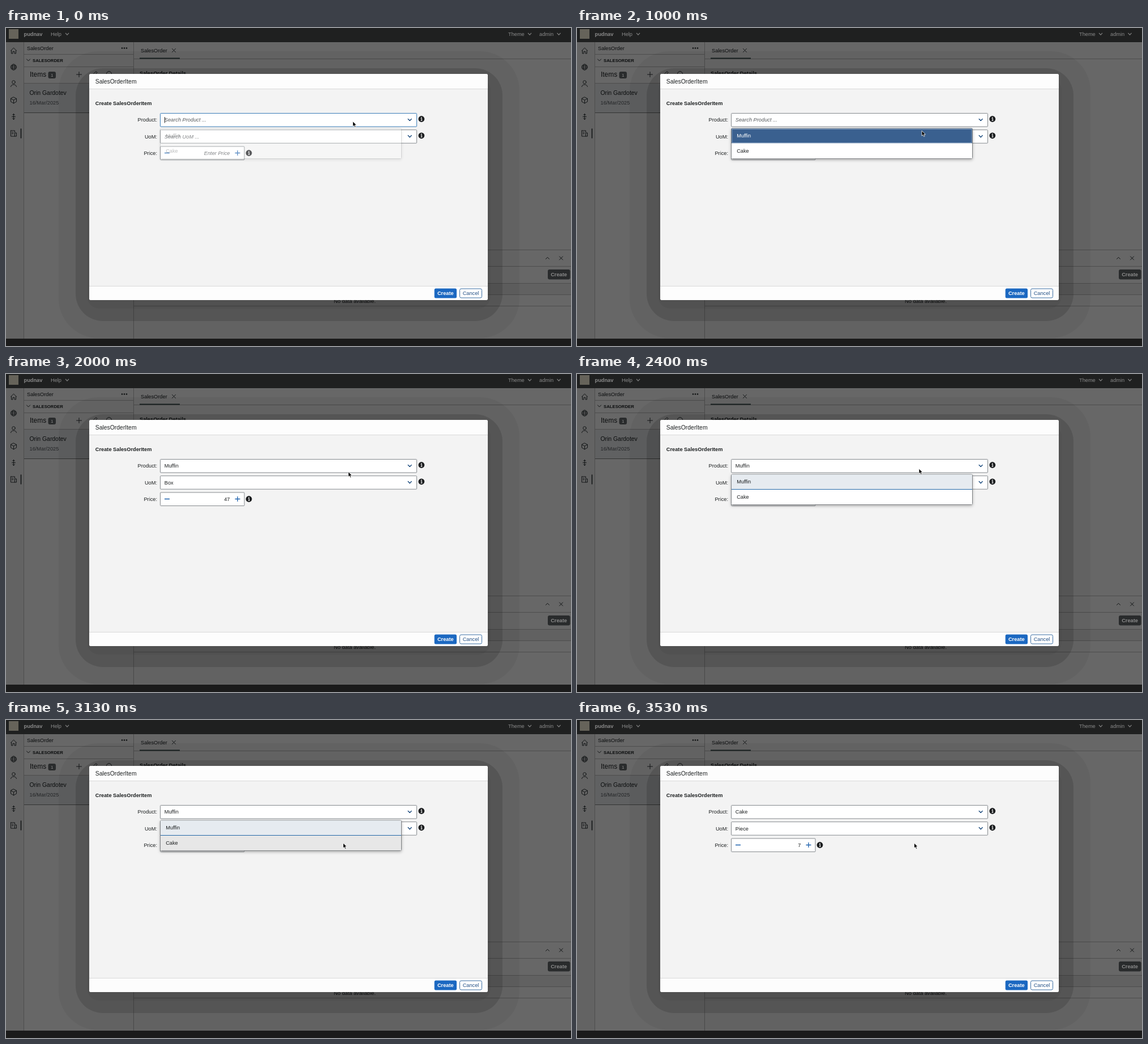
An HTML page that plays this animation: 998 by 561 pixels, repeating every 3670 ms.

```html
<!DOCTYPE html>
<html lang="en">
<head>
<meta charset="utf-8">
<title>Sales order dialog</title>
<style>
html, body { margin: 0; width: 100%; height: 100%; overflow: hidden; background: #666; }
svg { display: block; width: 998px; height: 561px; }
text { font: 9.24px "Liberation Sans", Arial, sans-serif; fill: #1d2021; white-space: pre; }
.b { font-weight: 700; }
.i { font-style: italic; fill: #55595c; }
.e { text-anchor: end; }
.m { text-anchor: middle; }
.big { font-size: 10.4px; }
.dim text { fill: #0b0d0e; }
.dim .bar { fill: #8a8a8a; }
.ico { fill: none; stroke: #121516; stroke-width: 1; stroke-linecap: round; stroke-linejoin: round; }
.rule { fill: none; stroke: #4d4d4d; stroke-width: 1; }
.box { fill: #fff; stroke: #858a8e; stroke-width: 1; }
.chev { fill: none; stroke: #1f4e80; stroke-width: 1.4; stroke-linecap: round; stroke-linejoin: round; }
.step { fill: none; stroke: #1b5fad; stroke-width: 1.3; }
</style>
</head>
<body>
<svg viewBox="0 0 998 561" xmlns="http://www.w3.org/2000/svg">
  <defs>
    <g id="info">
      <circle r="5.4" fill="#1b1d1f"/>
      <path d="M-1.2-.8H.4V2.6M-1.3 2.7H1.5" fill="none" stroke="#fff" stroke-width="1.1"/>
      <circle cy="-2.7" r=".85" fill="#fff"/>
    </g>
    <path id="down" d="M-3-1.6L0 1.6L3-1.6"/>
    <path id="cross" d="M-3-3L3 3M3-3L-3 3"/>
    <filter id="soft" x="-5%" y="-30%" width="110%" height="170%">
      <feDropShadow dx="0" dy="2" stdDeviation="2.4" flood-color="#000" flood-opacity=".28"/>
    </filter>
  </defs>

  <!-- dimmed page -->
  <g class="dim">
    <rect width="998" height="561" fill="#676767"/>
    <rect y="25" width="31" height="523" fill="#636363"/>
    <rect x="32" y="97" width="193" height="52" fill="#606162"/>
    <rect x="226" y="450" width="772" height="20" fill="#616161"/>
    <path class="rule" d="M31.500 25V548M225.500 25V548M32 46.500H225M32 68.500H225M32 97.500H225M226 54.500H998M226 391.500H998M226 420.500H998M226 450.500H998M226 470.500H998M226 490.500H998"/>
    <path d="M32 149.500H225" stroke="#333" />
    <rect x="236" y="52.500" width="71" height="2" fill="#1a2222"/>

    <text x="37" y="38.500">SalesOrder</text>
    <g fill="#0d1011"><circle cx="205" cy="35.500" r="1.3"/><circle cx="209" cy="35.500" r="1.3"/><circle cx="213" cy="35.500" r="1.3"/></g>
    <use href="#down" class="ico" x="39.500" y="56.500"/>
    <text class="b" x="47" y="59.500" style="font-size:7.75px">SALESORDER</text>
    <text x="42" y="86" style="font-size:11.9px">Items</text>
    <rect x="74.500" y="77" width="13.500" height="12" rx="3" fill="#292b2c"/>
    <text class="m bar" x="81.200" y="86" style="font-size:8px">1</text>
    <path class="ico" d="M124.500 82H133.500M129 77.500V86.500M154 84L154.500 81L159 76.500L161 78.500L157 83" stroke-width="1.2"/>
    <circle class="ico" cx="182" cy="81" r="4.500"/>
    <text class="big" x="41.500" y="118">Orin Gardotev</text>
    <text x="41.500" y="135" style="fill:#232527">16/Mar/2025</text>

    <text x="238" y="43">SalesOrder</text>
    <use href="#cross" class="ico" x="296.500" y="39.500"/>
    <text class="b" x="236" y="82.500">SalesOrder Details</text>
    <path class="ico" d="M953.500 407.500L956.500 404.500L959.500 407.500"/>
    <use href="#cross" class="ico" x="980.500" y="406"/>
    <text class="m" x="616" y="484.500">No data available.</text>

    <g class="ico">
      <path d="M8.500 40L13.500 35L18.500 40M9.500 39.500V45H12V41.500H15V45H17.500V39.500"/>
      <circle cx="13.500" cy="69" r="5"/>
      <ellipse cx="13.500" cy="69" rx="2.300" ry="5"/>
      <path d="M8.500 69H18.500M9.200 66.500H17.800M9.200 71.500H17.800"/>
      <circle cx="13.500" cy="95.500" r="2.800"/>
      <path d="M8.500 103.500C9 98.500 18 98.500 18.500 103.500"/>
      <path d="M13.500 122L18.500 124.500V130L13.500 132.800L8.500 130V124.500ZM8.500 124.500L13.500 127.200L18.500 124.500M13.500 127.200V132.800"/>
      <path d="M13.500 151.500V161.500M11.500 153.500L13.500 151.500L15.500 153.500M11.500 159.500L13.500 161.500L15.500 159.500M10.500 156.500H16.500"/>
      <path d="M8.500 181H15.500V184M8.500 181V191H18.500V185H15.500V191M10.500 184H13M10.500 186.500H13"/>
      <path d="M26.500 178V194" stroke-width="1.600"/>
    </g>

    <!-- stepped shade around the dialog -->
    <rect x="93" y="41" width="814" height="506" rx="70" opacity=".05"/>
    <rect x="123" y="71" width="754" height="446" rx="48" opacity=".13"/>
    <rect x="143" y="88" width="713" height="407" rx="22" opacity=".05"/>

    <rect x="957" y="426" width="39.500" height="17.500" rx="3" fill="#292b2c"/>
    <text class="b m bar" x="976.500" y="438">Create</text>

    <rect width="998" height="25" fill="#1f2020"/>
    <rect y="548" width="998" height="13" fill="#1b1b1b"/>
    <rect x="5" y="2" width="17" height="17" fill="#66635a"/>
    <text class="b bar" x="31.500" y="13.500">pudnav</text>
    <text class="bar" x="79" y="13.500">Help</text>
    <text class="bar" x="887" y="13.500">Theme</text>
    <text class="bar" x="942" y="13.500">admin</text>
    <g fill="none" stroke="#858585" stroke-width="1.200">
      <use href="#down" x="108" y="10.500"/><use href="#down" x="925" y="10.500"/><use href="#down" x="976.500" y="10.500"/>
    </g>
  </g>

  <!-- dialog -->
  <rect x="147" y="81" width="704" height="399" rx="3" fill="#f3f3f3"/>
  <path d="M147 107V84Q147 81 150 81H848Q851 81 851 84V107ZM147 456V477Q147 480 150 480H848Q851 480 851 477V456Z" fill="#fdfdfd"/>
  <path d="M147 107.500H851M147 455.500H851" stroke="#d9d9d9"/>
  <text class="big" x="157.800" y="98">SalesOrderItem</text>
  <text class="b" x="157.800" y="136">Create SalesOrderItem</text>
  <text class="e" x="267" y="165.200">Product:</text>
  <text class="e" x="267" y="194.500">UoM:</text>
  <text class="e" x="267" y="223.700">Price:</text>

  <rect id="field" class="box" x="272.500" y="150.500" width="453" height="23.500" rx="1"/>
  <rect class="box" x="272.500" y="179.700" width="453" height="23.500" rx="1"/>
  <rect class="box" x="272.500" y="209" width="148.500" height="23.500" rx="1"/>
  <text id="product" x="279.800" y="165.200"></text>
  <text id="uom" x="279.800" y="194.500"></text>
  <text id="price" class="e" x="395.500" y="223.700"></text>
  <path id="caret" d="M280.500 157V167.500" stroke="#222"/>
  <use href="#down" class="chev" x="713.200" y="162"/>
  <use href="#down" class="chev" x="713.200" y="191.200"/>
  <path class="step" d="M280 220.500H289M404.500 220.500H413.500M409 216V225"/>
  <use href="#info" x="733.800" y="160.500"/>
  <use href="#info" x="733.800" y="189.800"/>
  <use href="#info" x="429" y="220.500"/>

  <rect x="756.700" y="459.500" width="39.300" height="17" rx="2.500" fill="#1b68c1"/>
  <text class="b m" x="776.300" y="471" style="fill:#fff">Create</text>
  <rect x="801.500" y="460" width="39" height="16" rx="2.500" fill="#fff" stroke="#3a6ea3"/>
  <text class="m" x="821" y="471" style="fill:#224f85">Cancel</text>

  <!-- options list -->
  <g id="list">
    <rect x="272.500" y="177" width="426" height="53.500" rx="2" fill="#fff" stroke="#7b7f82" filter="url(#soft)"/>
    <rect id="row0" x="273" y="177.500" width="425" height="26"/>
    <rect id="row1" x="273" y="203.500" width="425" height="26.500"/>
    <path id="mark" d="M273 203.500H698" stroke="#2468a8"/>
    <rect id="ring" x="274" y="178.500" width="423" height="24" fill="none" stroke="#b9cbe0" stroke-dasharray="1 1"/>
    <text id="opt0" x="282.200" y="193">Muffin</text>
    <text id="opt1" x="282.200" y="219.700">Cake</text>
  </g>

  <path id="arrow" d="M0 0V9L2.100 7.200L3.600 10.400L5.200 9.700L3.700 6.600H6.500Z" fill="#000" stroke="#fff" stroke-width=".8"/>
</svg>
<script>
const LOOP = 3670, TICK = 20 / 3;
const $ = id => document.getElementById(id);
const set = (id, attrs) => { for (const k in attrs) $(id).setAttribute(k, attrs[k]); };
const ease = p => p * p * (3 - 2 * p);

// keyed values: [time, value, ...]
function mix(keys, t, curve = p => p) {
  let a = keys[0];
  for (const b of keys) {
    if (t < b[0]) {
      const p = curve((t - a[0]) / (b[0] - a[0]));
      return a.slice(1).map((v, i) => v + (b[i + 1] - v) * p);
    }
    a = b;
  }
  return a.slice(1);
}

const path = [
  [0, 612.6, 164.7], [200, 611.7, 170], [530, 611.7, 170], [730, 609, 181.2],
  [1730, 609, 181.2], [2000, 604.7, 172.5], [2200, 604, 167], [2470, 604, 167],
  [2800, 595.6, 201], [3000, 595.5, 217], [3670, 595.5, 217]
];
const fade = [
  [0, .28], [200, 1], [1060, 1], [1200, 0], [2260, 0], [2400, 1], [3195, 1], [3330, 0]
];

function entry(id, value, hint) {
  $(id).textContent = value || hint;
  $(id).classList.toggle("i", !value);
}

function draw(t) {
  const [x, y] = mix(path, t, ease);
  const [open] = mix(fade, t);
  const again = t >= 2000;
  const over = y < 177 ? -1 : y < 203.5 ? 0 : 1;
  const press = t >= 930 && t < 1300 ? 0 : t >= 3190 ? 1 : -1;

  entry("product", t >= 3260 ? "Cake" : t >= 1060 ? "Muffin" : "", "Search Product ...");
  entry("uom", t >= 3470 ? "Piece" : t >= 1470 ? "Box" : "", "Search UoM ...");
  entry("price", t >= 3530 ? "7" : t >= 1530 ? "47" : "", "Enter Price");
  set("field", { stroke: t < 930 ? "#3b7db8" : "#858a8e" });
  $("field").style.stroke = t < 930 ? "#3b7db8" : "";
  set("caret", { opacity: t < 530 ? 1 : 0 });
  if (t >= 530 || t < 0) set("caret", { opacity: 0 });

  set("list", { opacity: open, visibility: open > 0 ? "visible" : "hidden" });
  for (const n of [0, 1]) {
    const picked = again && n === 0;
    const fill = press === n ? "#3a608f"
      : over === n ? (picked ? "#d1e4f4" : "#e7e7e7")
      : picked ? "#e6ebf0" : "#fff";
    set("row" + n, { fill });
    $("opt" + n).style.fill = press === n ? "#fff" : "";
  }
  set("mark", { opacity: again ? 1 : 0 });
  set("ring", { y: press === 1 ? 205 : 178.5, opacity: press < 0 ? 0 : 1 });
  set("arrow", { transform: `translate(${x} ${y})` });
}

function frame(now) {
  const t = now % LOOP;
  const step = Math.floor((Math.floor(t / 10) + .5) / TICK);
  draw(Math.round(step * TICK) * 10);
  requestAnimationFrame(frame);
}
draw(0);
requestAnimationFrame(frame);
</script>
</body>
</html>
```
